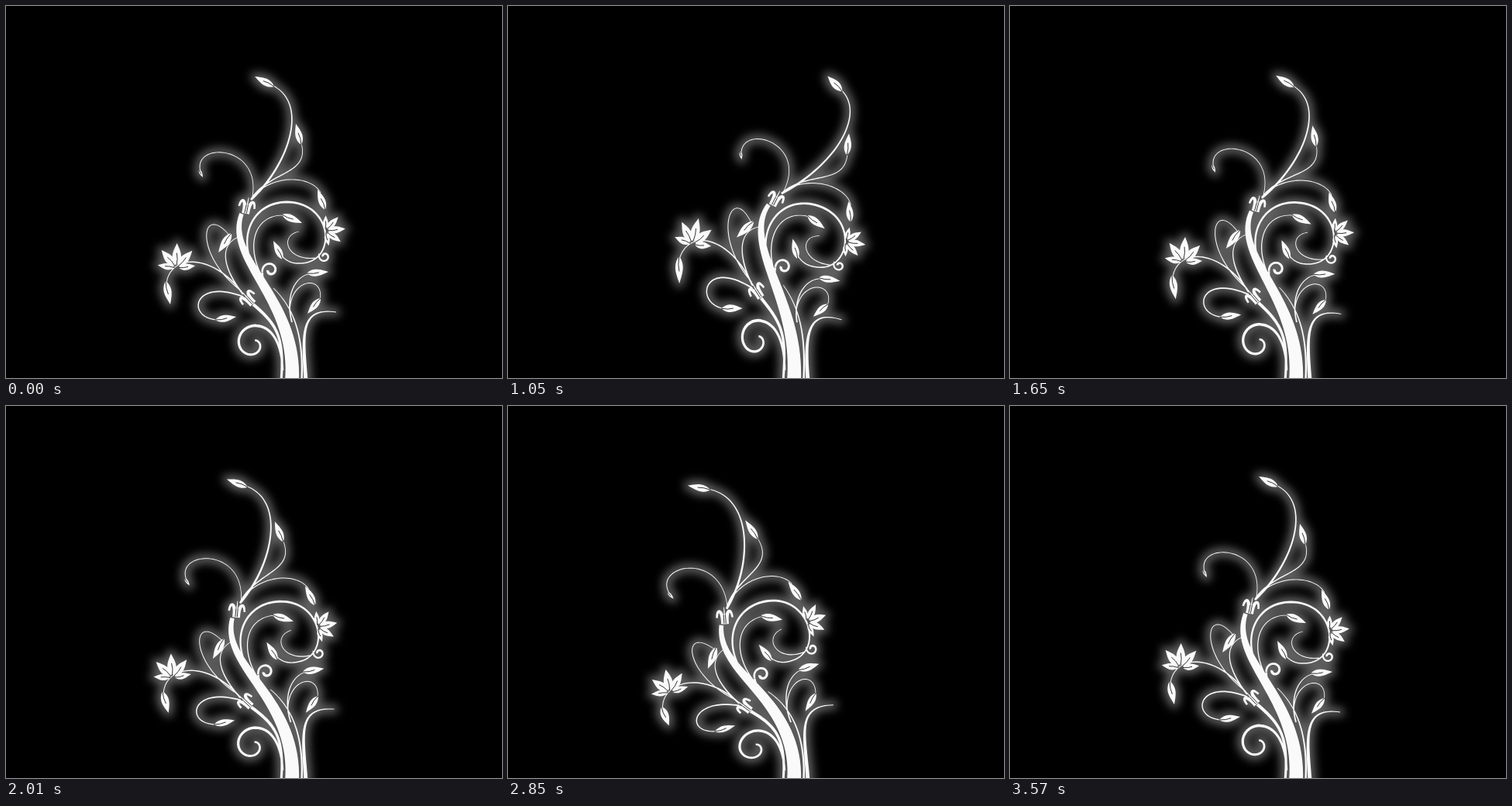
An HTML page with a canvas for the animation above (3600 ms loop, 640x480 px).

```html
<!DOCTYPE html>
<html lang="en">
<head>
<meta charset="utf-8">
<title>Swaying vine</title>
<style>
  html, body { margin: 0; width: 100%; height: 100%; overflow: hidden; background: #000; }
  canvas { display: block; }
</style>
</head>
<body>
<canvas id="stage" width="640" height="480"></canvas>
<script>
const ctx = document.getElementById('stage').getContext('2d');
const STEP = 30, STEPS = 120;
const ROOT = { x: 370, y: 480 };
const shapes = [];   // closed outlines at rest
const veins = [];    // dark lines inside leaves, petals and buds

// Ribbon along point(t), its width going from w0 to w1.
function ribbon(w0, w1, point, n = 36) {
  const left = [], right = [];
  for (let i = 0; i <= n; i++) {
    const t = i / n, [x, y] = point(t), [ax, ay] = point(t - 0.01), [bx, by] = point(t + 0.01);
    const w = (w0 + (w1 - w0) * t) / 2 / Math.hypot(bx - ax, by - ay);
    const nx = (ay - by) * w, ny = (bx - ax) * w;
    left.push([x + nx, y + ny]);
    right.unshift([x - nx, y - ny]);
  }
  shapes.push([...left, ...right]);
}

// Cubic curve: start, two handles, end.
function stem(w0, w1, x0, y0, x1, y1, x2, y2, x3, y3) {
  const mix = (a, b, c, d, t) => {
    const u = 1 - t;
    return a * u * u * u + 3 * b * u * u * t + 3 * c * u * t * t + d * t * t * t;
  };
  ribbon(w0, w1, t => [mix(x0, x1, x2, x3, t), mix(y0, y1, y2, y3, t)]);
}

// Coil shrinking from r0 to r1, starting at angle a and turning by sweep.
function coil(w0, w1, x, y, r0, r1, a, sweep) {
  ribbon(w0, w1, t => {
    const r = r0 + (r1 - r0) * t, b = a + sweep * t;
    return [x + r * Math.cos(b), y + r * Math.sin(b)];
  });
}

// Pointed leaf from base to tip.
function leaf(x0, y0, x1, y1, fat = 0.18) {
  const dx = x1 - x0, dy = y1 - y0;
  const at = (u, v) => [x0 + dx * u - dy * v, y0 + dy * u + dx * v];
  const up = [], down = [];
  for (let u = 0; u <= 1; u += 1 / 12) {
    const belly = fat * Math.sin(Math.PI * u ** 0.85) * (1 - 0.25 * u);
    up.push(at(u, belly));
    down.unshift(at(u, -belly));
  }
  shapes.push([...up, ...down]);
  veins.push([at(0, 0), at(0.3, 0.03), at(0.55, 0)]);
}

// Five petals fanned around one direction.
function flower(x, y, dir, size) {
  for (let i = -2; i <= 2; i++) {
    const a = dir + i * 0.72, len = size * (1 - 0.06 * i * i);
    const c = Math.cos(a), s = Math.sin(a);
    leaf(x + 3 * c, y + 3 * s, x + len * c, y + len * s, 0.22);
  }
}

// Three-part bud with curled side petals.
function bud(x, y, angle) {
  const c = Math.cos(angle), s = Math.sin(angle);
  const at = (u, v) => [x + u * c - v * s, y + u * s + v * c];
  for (const k of [-1, 1]) {
    stem(5, 2.5, ...at(2.5 * k, 10), ...at(2 * k, -8), ...at(9 * k, -11), ...at(10 * k, 2));
    veins.push([at(1.2 * k, 9), at(1.2 * k, -1)]);
  }
  stem(2.5, 0.8, ...at(0, 10), ...at(0, 4), ...at(0, -4), ...at(0, -11));
}

// Trunk and the lines beside it
stem(5.5, 18, 304, 268, 282, 328, 376, 376, 369, 484);
stem(0.8, 2.5, 345, 364, 374, 392, 384, 430, 381.5, 484);
stem(0.8, 5, 426, 395, 378, 388, 383, 425, 387, 484);
stem(4, 3, 319, 385, 348, 410, 360, 425, 355, 484);

// Bottom curl
stem(2.5, 3.5, 357, 470, 356, 440, 346, 414, 323, 412.5);
coil(3.5, 2.5, 319, 436, 24, 5, -1.4, -6);

// Left arm: bud, loops and flower
bud(312, 377, -0.75);
stem(1.8, 1.2, 306, 375, 240, 350, 232, 404, 274, 405);
leaf(270, 405, 297, 401);
stem(1.8, 1, 306, 372, 270, 320, 212, 318, 207, 358);
leaf(206, 355, 212, 385);
stem(1.2, 0.8, 304, 368, 240, 320, 252, 250, 290, 298);
leaf(291, 293, 274, 318);
stem(1.8, 0.7, 305, 371, 278, 335, 276, 308, 300, 298);
flower(220, 338, -1.55, 32);

// Crown
bud(311, 258, 0.2);
stem(2.8, 1, 316, 250, 365, 205, 392, 125, 343, 102);
leaf(346, 104, 321, 91);
stem(1.8, 0.8, 317, 248, 342, 212, 392, 218, 381, 177);
leaf(381, 179, 374, 152);
stem(0.8, 1, 318, 246, 330, 175, 232, 175, 253, 219);
leaf(249, 211, 254, 221);
stem(1.2, 0.8, 319, 245, 348, 215, 395, 220, 406, 241);
leaf(412, 263, 402, 237);

// Big spiral
stem(2, 2.8, 330, 354, 292, 305, 316, 253, 362, 253);
stem(2.8, 1.5, 362, 253, 423, 253, 428, 331, 380, 332);
stem(1.5, 1, 380, 332, 366, 333, 358, 326, 353, 318);
leaf(357, 327, 345, 303);
stem(1.2, 0.7, 400, 325, 362, 330, 352, 296, 378, 291);
stem(1.5, 0.8, 332, 352, 308, 310, 320, 268, 360, 270);
leaf(356, 269, 382, 280);
coil(2, 3, 411, 323, 7.5, 2, 3.6, -6.8);
stem(2, 2.5, 336, 362, 334, 355, 330, 350, 331, 344);
coil(2.5, 3.5, 341, 341, 10.5, 3, 2.9, 6.5);
flower(412, 290, -0.1, 26);

// Lower right twigs
stem(1.8, 0.8, 369, 408, 360, 375, 372, 348, 394, 345);
leaf(388, 345, 416, 343);
stem(1.2, 0.8, 366, 395, 366, 350, 412, 346, 405, 380);
leaf(406, 377, 389, 397);

// Bend a resting point; s is the sway from -1 to 1.
function bend([x, y], s) {
  const h = Math.max(0, ROOT.y - y);
  const turn = 0.3 * (1 - Math.exp(-h / 100)) * s;
  const off = x - ROOT.x + Math.min(27, 0.00029 * h * h);
  return [
    x + s * h * h / (1180 + 1.1 * h) - off * (1 - Math.cos(turn)),
    y + off * Math.sin(turn) + 6 * s * s * (h / 389) ** 2
  ];
}

function trace(lines, s, close) {
  const path = new Path2D();
  for (const line of lines) {
    line.forEach((p, i) => path[i ? 'lineTo' : 'moveTo'](...bend(p, s)));
    if (close) path.closePath();
  }
  return path;
}

function draw() {
  const step = Math.floor(performance.now() / STEP) % STEPS;
  const s = Math.sin(2 * Math.PI * step / (STEPS - 1));
  const vine = trace(shapes, s, true);
  ctx.fillStyle = '#000';
  ctx.fillRect(0, 0, 640, 480);
  ctx.lineJoin = ctx.lineCap = 'round';
  ctx.filter = 'blur(6px)';
  ctx.strokeStyle = '#606060';
  ctx.lineWidth = 11;
  ctx.stroke(vine);
  ctx.filter = 'none';
  ctx.fillStyle = '#fafafa';
  ctx.fill(vine);
  ctx.strokeStyle = '#333';
  ctx.lineWidth = 1;
  ctx.stroke(trace(veins, s, false));
  requestAnimationFrame(draw);
}
draw();
</script>
</body>
</html>
```
